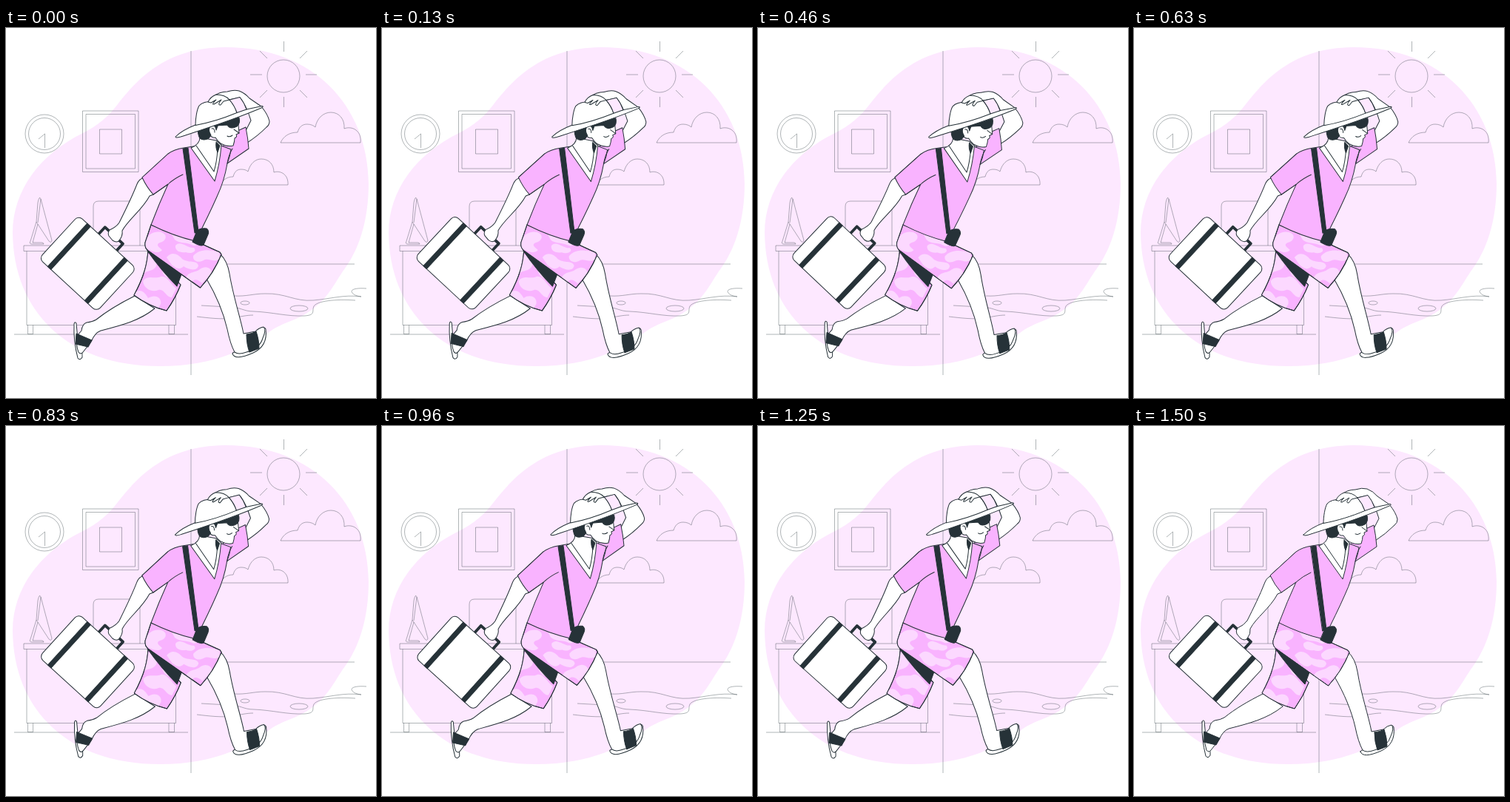
An HTML page that plays this animation: 500x500 px, repeating every 1.54 s.

```html
<!DOCTYPE html>
<html lang="en">
<head>
<meta charset="utf-8">
<title>Off on holiday</title>
<style>
  /* a typed angle keeps the figure redrawn sharply while it turns */
  @property --tilt { syntax: "<angle>"; inherits: false; initial-value: 0deg; }
  html, body { margin: 0; width: 100%; height: 100%; overflow: hidden; background: #fff; }
  svg { display: block; width: 100%; height: 100%; }
  .scene { fill: none; stroke: #263238; stroke-opacity: .36; stroke-width: 1; }
  .man { fill: #fff; stroke: #263238; stroke-width: 1; stroke-linejoin: round; stroke-linecap: round;
         transform-origin: 202px 266px; transform: rotate(var(--tilt)); animation: sway 1540ms linear infinite; }
  .blob { fill: #fde8ff; }
  .pink { fill: #f9b3ff; }
  .dark { fill: #263238; }
  .line { fill: none; }
  .camo { fill: #fcd8ff; stroke: none; }
  /* a 1500 ms sway, then a short rest */
  @keyframes sway {
    0%, 97.4%, 100% { --tilt: 0deg; }
    24.35% { --tilt: 1deg; }
    73.05% { --tilt: -1deg; }
  }
</style>
</head>
<body>
<svg viewBox="0 0 500 500">
  <defs>
    <path id="near" d="M196 266L188 290Q187 297 192 301L262.500 351Q281 331 291 306L289 303L256 288Z"/>
    <path id="far" d="M192 300C191 318 187 335 173 361Q193 376 217 382Q229 365 236 347Z"/>
    <clipPath id="nearClip"><use href="#near"/></clipPath>
    <clipPath id="farClip"><use href="#far"/></clipPath>
  </defs>

  <path class="blob" d="M295 26C215 27 178 69 151 103C139 119 124 132 104 142C48 169 9 218 9 277C10 382 82 457 208 457C284 457 328 432 358 409C373 399 388 396 402 388C432 371 441 350 455 329C476 302 490 262 490 210C489 104 414 25 295 26Z"/>

  <g class="scene">
    <path d="M250 31V469M250 319H471M11 414H246"/>

    <circle cx="375" cy="65" r="22"/>
    <path d="M375.500 18V32M375.500 93V107M330 63H346M405 63H420M343 31L353 41M407 31L397 41M343 94L353 84M407 94L397 84"/>
    <path d="M371 155c4-9 12-14 23-14c2-7 6-11 13-11c5 0 9 2 11 4c2-12 11-20 21-20c11 0 19 9 18 22c10-4 24 2 22 19z"/>
    <path d="M290 212c2-6 8-11 17-11c2-8 6-10 11-10c4 0 7 1 9 3c3-11 10-17 18-17c10 0 17 7 17 18c9-3 20 3 19 17z"/>

    <path d="M487 352C474 351 464 353 468 358Q471 362 480 363C455 360 440 366 415 368C390 370 378 358 350 359C334 359 325 363 308 362"/>
    <path d="M472 368C445 366 420 369 416 376C413 383 419 388 403 389C380 390 360 384 335 383C320 383 318 377 300 377L264 375M258 390C275 392 292 394 305 392C318 390 325 388 334 388"/>
    <ellipse cx="396" cy="379" rx="12" ry="4"/>
    <ellipse cx="323" cy="371.500" rx="6" ry="2.500"/>

    <circle cx="52" cy="143" r="26"/>
    <circle cx="52" cy="143" r="21.500"/>
    <path d="M52.500 162V143L44 150"/>
    <path d="M103.500 112H179V194.500H103.500ZM108 116.500H174.500V190H108ZM126.500 137H156.500V170H126.500Z"/>

    <path d="M43 236Q45 226 47 231L62 287Q61 291 58 288L41 262ZM47 231L43 263M41 262L33 288Q31 292 35 292H51Q51 290 48 290H36L43 265"/>
    <path d="M118 294V241Q118 234 125 234H174Q181 234 181 241V294"/>
    <path d="M24 294H233V301.500H24ZM28 301.500V401.500H229.500V301.500M29.500 401.500V413.500H36.500V401.500M220 401.500V413.500H227.500V401.500"/>
  </g>

  <g class="man">
    <!-- trailing leg -->
    <path d="M92 400Q93 396 95 399L97 421Q104 437 103 445Q100 450 97 446Q91 423 92 400Z"/>
    <path d="M174 362C154 372 137 382 122 394Q117 397 109 398Q103 400 102 409L96 416Q94 428 98 438Q101 442 104 438L115 424Q120 412 128 409C155 402 180 396 201 379Z"/>
    <path class="dark" d="M95 413L116 422L111 431L94 427Z"/>
    <use href="#far" class="pink"/>
    <g class="camo" clip-path="url(#farClip)">
      <path d="M190 306C198 304 206 312 203 322C198 330 190 327 186 332ZM185 342C192 333 201 340 209 336C218 334 222 346 230 352L224 364C216 364 214 352 206 354C197 358 186 352 185 342ZM173 358C182 351 188 358 192 365C201 359 211 364 209 373L204 382L172 364ZM211 322C219 324 228 332 224 339C215 339 209 330 211 322Z"/>
    </g>
    <use href="#far" class="line"/>
    <path class="dark" d="M191 301L237 333L231 349Q210 328 191 301Z"/>

    <!-- leading leg -->
    <path d="M306 440Q307 437 312 438C330 434 342 422 345 408Q349 402 351 407C353 422 347 433 334 439Q309 450 306 440Z"/>
    <path d="M271 339C284 361 294 385 299 407Q303 427 309 438Q314 442 325 438Q343 433 347 419Q352 408 348 404Q342 405 337 410L321 413C317 392 307 363 302 332Q299 314 289 305Z"/>
    <path class="dark" d="M325 414Q333 413 338 410Q342 422 342 433L329 438Q325 427 325 414Z"/>

    <use href="#near" class="pink"/>
    <g class="camo" clip-path="url(#nearClip)">
      <path d="M188 288C192 278 201 274 210 276C219 279 217 288 208 290C201 293 208 297 211 300C205 307 195 300 188 298ZM222 275L256 288C264 291 256 296 251 293C243 289 235 292 228 286ZM229 294C236 286 245 298 254 297C259 302 250 306 243 303C235 304 228 301 229 294ZM217 310C224 301 233 306 238 312C246 318 258 313 260 321C258 330 246 326 240 322C234 328 229 324 224 320ZM253 308C261 298 276 299 288 303L289 312C280 318 274 310 267 314C260 318 252 315 253 308ZM243 338C247 328 257 331 262 326C270 320 279 325 278 332L265 345C258 337 251 340 250 346Z"/>
    </g>
    <use href="#near" class="line"/>

    <!-- raised arm -->
    <path d="M311 164L331 125Q325 105 316 94L301 97Q288 91 280 93Q288 86 299 86Q308 83 315 85Q323 88 329 95L345 106Q354 117 356 126Q356 131 352 134Q340 146 326 155Z"/>
    <path class="pink" d="M290 163L313 139L324 134Q327 149 328 163L299 183Z"/>

    <!-- torso -->
    <path class="pink" d="M253 160L240 162Q227 164 219 170L184 202Q190 215 199 225L219 211Q207 237 196 266Q226 281 256 288Q274 253 285 228Q295 207 299 183Q303 173 304 164L291 159Z"/>
    <path class="line" d="M219 211Q228 203 239 198M299 183Q301 171 306 163"/>
    <path d="M250 162L282 207Q289 184 291 158L284 152L262 148Q262 157 250 162Z"/>
    <path class="line" d="M257 159L281 194Q285 181 286 163"/>
    <path class="dark" d="M284 154L289 159L286 168Q283 162 284 154Z"/>
    <path class="dark" d="M239 163L246 162L260 275L255 277Z"/>
    <path class="dark" d="M258 274Q263 270 271 271Q275 274 273 279L267 293Q264 296 252 289Z"/>

    <!-- head -->
    <path d="M278 131Q271 134 274 142Q277 149 283 148Q286 153 290 156Q299 161 307 159Q309 153 309 149Q313 147 311 144L315 142Q314 131 313 120L286 124Z"/>
    <path class="dark" d="M259 132Q259 145 262 149Q267 153 274 149L277 145Q272 137 277 132Q283 130 284 138L288 127L285 122Z"/>
    <path class="line" d="M278 136Q282 135 282 141M299 146Q302 148 306 145M308 137L315 142"/>
    <path class="dark" d="M285 128L299 125L315 121Q317 129 312 133Q303 138 299 131L285 132Z"/>

    <!-- hat -->
    <path d="M229 147Q238 138 256 131L320 111L346 105.500Q349 106 345 108C308 124 270 136 236 147Q229 149 229 147Z"/>
    <path d="M256 131.500C256 122 258 110 261 105Q266 99 281 99Q293 94 302 97Q309 105 312 114.500C294 122 275 128 256 131.500Z"/>
    <path class="blob" d="M302 97L316 93.500Q322 101 325 110L312 114.500Q309 105 302 97Z"/>
    <path d="M273 100Q276 93 284 90Q296 90 302 97L294 99L290 104Q285 104 291 97L281 103Q277 104 284 97L277 101Z"/>

    <!-- suitcase -->
    <g transform="translate(110.300 318.300) rotate(42.600)">
      <path class="line" d="M-16-39V-52H17V-39" stroke-width="3.800"/>
      <rect x="-53" y="-39.500" width="106" height="79" rx="7"/>
      <path class="dark" d="M-37-39.500h6v79h-6zM31-39.500h6v79h-6z"/>
    </g>
    <path d="M185 203Q180 204 177 211C170 229 161 247 153 263Q149 269 140 273Q137 277 139 281L144 287Q150 291 153 287Q158 281 157 274C165 259 184 246 194 227L199 225Z"/>
    <path class="pink" d="M219 170L184 202Q190 215 199 225L219 211L230 190Z" stroke="none"/>
    <path class="line" d="M219 170L184 202Q190 215 199 225L219 211"/>
  </g>
</svg>
</body>
</html>
```
